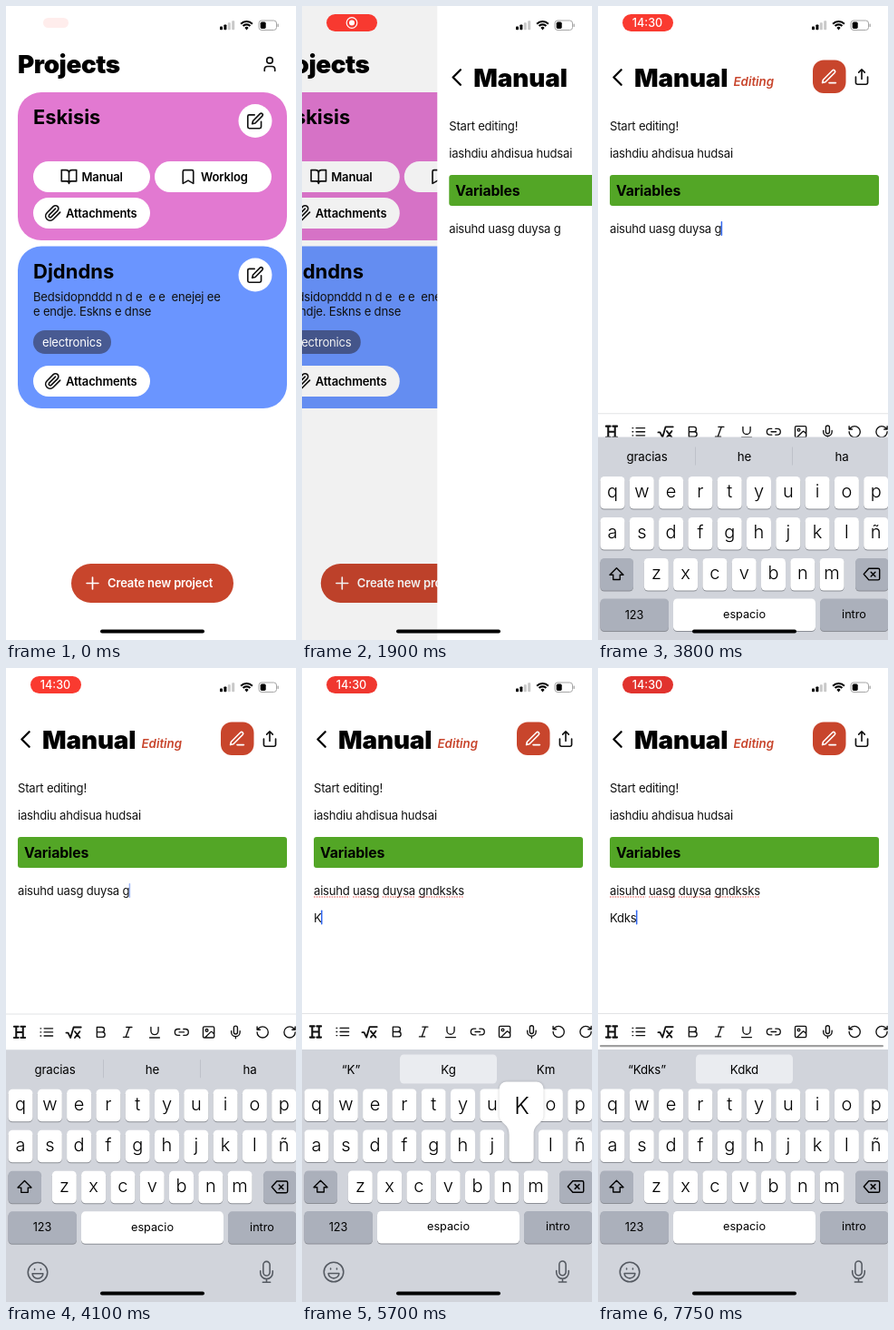
An HTML page with a canvas that plays this animation: 320x698 px, repeating every 8000 ms.

```html
<!DOCTYPE html>
<html lang="en">
<head>
<meta charset="utf-8">
<title>Projects app</title>
<style>
html, body { margin: 0; width: 100%; height: 100%; overflow: hidden; background: #fff; }
canvas { display: block; width: 100vw; height: 100vh; }
</style>
</head>
<body>
<canvas id="stage"></canvas>
<script>
const W = 320, H = 698, LOOP = 8000;
const canvas = document.getElementById('stage');
const ctx = canvas.getContext('2d');
const RED = '#c8452c';

const ICONS = {
  user: 'M19 21v-2a4 4 0 0 0-4-4H9a4 4 0 0 0-4 4v2M16 7a4 4 0 1 1-8 0a4 4 0 1 1 8 0',
  book: 'M2 3h6a4 4 0 0 1 4 4v14a3 3 0 0 0-3-3H2zM22 3h-6a4 4 0 0 0-4 4v14a3 3 0 0 1 3-3h7z',
  bookmark: 'M19 21l-7-4-7 4V5a2 2 0 0 1 2-2h10a2 2 0 0 1 2 2z',
  clip: 'M21.4 11l-9.2 9.2a6 6 0 0 1-8.5-8.5l8.6-8.6A4 4 0 1 1 18 8.8l-8.6 8.6a2 2 0 0 1-2.8-2.8l8.5-8.5',
  edit: 'M11 4H4a2 2 0 0 0-2 2v14a2 2 0 0 0 2 2h14a2 2 0 0 0 2-2v-7M18.5 2.5a2.1 2.1 0 0 1 3 3L12 15l-4 1 1-4z',
  pen: 'M12 20h9M16.5 3.5a2.1 2.1 0 0 1 3 3L7 19l-4 1 1-4z',
  share: 'M4 12v8a2 2 0 0 0 2 2h12a2 2 0 0 0 2-2v-8M16 6l-4-4-4 4M12 2v13',
  back: 'M15 18l-6-6 6-6',
  plus: 'M5 12h14M12 5v14',
  heading: 'M3 3h7M14 3h7M3 21h7M14 21h7M6.5 3v18M17.5 3v18M7 12h10',
  list: 'M8 6h14M8 12h14M8 18h14M2 6h1M2 12h1M2 18h1',
  root: 'M0 13h3l4 8L12 4h12M14 11l8 10M22 11l-8 10',
  bold: 'M14 12a4 4 0 0 0 0-8H6v8M15 20a4 4 0 0 0 0-8H6v8z',
  italic: 'M19 4h-9M14 20H5M15 4L9 20',
  underline: 'M6 4v6a6 6 0 0 0 12 0V4M4 21h16',
  link: 'M9 17H6A5 5 0 0 1 6 7h3M15 7h3a5 5 0 0 1 0 10h-3M8 12h8',
  image: 'M5 3h14a2 2 0 0 1 2 2v14a2 2 0 0 1-2 2H5a2 2 0 0 1-2-2V5a2 2 0 0 1 2-2zM11 9a2 2 0 1 1-4 0a2 2 0 1 1 4 0M21 15l-3.1-3.1a2 2 0 0 0-2.8 0L6 21',
  mic: 'M12 2a3 3 0 0 0-3 3v7a3 3 0 0 0 6 0V5a3 3 0 0 0-3-3zM19 10v2a7 7 0 0 1-14 0v-2M12 19v3',
  dictate: 'M12 1a3.5 3.5 0 0 0-3.5 3.500v8a3.500 3.500 0 0 0 7 0v-8A3.500 3.500 0 0 0 12 1zM18.500 11v2a6.500 6.500 0 0 1-13 0v-2M12 19.500v3.500M8 23h8',
  undo: 'M3 12a9 9 0 1 0 9-9 9.7 9.7 0 0 0-6.7 2.7L3 8M3 3v5h5',
  redo: 'M21 12a9 9 0 1 1-9-9 9.7 9.7 0 0 1 6.7 2.7L21 8M21 3v5h-5',
  shift: 'M12 3L2 13h5v7h10v-7h5z',
  erase: 'M8 4h13a2 2 0 0 1 2 2v12a2 2 0 0 1-2 2H8L1 12zM11 9l6 6M17 9l-6 6',
  smile: 'M23 12a11 11 0 1 1-22 0a11 11 0 1 1 22 0M6 13.5h12a6 5.500 0 0 1-12 0M8.500 8v1M15.500 8v1'
};
for (const name in ICONS) ICONS[name] = new Path2D(ICONS[name]);

const TOOLS = ['heading', 'list', 'root', 'bold', 'italic', 'underline', 'link', 'image', 'mic', 'undo', 'redo'];
const ROWS = [['qwertyuiop', 16], ['asdfghjklñ', 16], ['zxcvbnm', 64.3]];
const PITCH = 32.3;

const T = { push: 1800, edit: 3100, focus: 3700, keyboard: 3650, enter: 5350, drag: 6150 };
const STROKES = [
  ...[...'ndksks'].map((ch, i) => ({ ch, at: 4350 + 130 * i, line: 0 })),
  ...[...'Kdks'].map((ch, i) => ({ ch, at: 5600 + 115 * i, line: 1 }))
];
const HINTS = [
  [0, 'gracias', 'he', 'ha'],
  [4350, '“gn”', 'gen', 'generalist'],
  [4500, '“gnd”', 'gen', 'generalist'],
  [5180, '“gndksks”', '', ''],
  [T.enter, 'Hola', 'No', 'Que'],
  [5620, '“K”', 'Kg', 'Km'],
  [5960, '“Kdks”', 'Kdkd', '']
];
const SCROLL = [[T.drag, 0], [6330, 43.5], [6400, 43.5], [6600, 50], [6750, 43.5], [7250, 0], [7450, -5], [7740, 0]];

const clamp = v => Math.min(1, Math.max(0, v));
const ramp = (t, a, b) => clamp((t - a) / (b - a));
const smooth = v => v * v * (3 - 2 * v);
const mix = (a, b, k) => a + (b - a) * k;
const spring = ms => ms <= 0 ? 1 : (1 + ms / 50) * Math.exp(-ms / 50);

function track(keys, t) {
  if (t <= keys[0][0]) return keys[0][1];
  for (let i = 1; i < keys.length; i++) {
    const [a, u] = keys[i - 1], [b, v] = keys[i];
    if (t < b) return mix(u, v, smooth(ramp(t, a, b)));
  }
  return keys[keys.length - 1][1];
}

function box(x, y, w, h, r, color) {
  ctx.fillStyle = color;
  ctx.beginPath();
  ctx.roundRect(x, y, w, h, r);
  ctx.fill();
}

function disc(x, y, r, color) {
  ctx.fillStyle = color;
  ctx.beginPath();
  ctx.arc(x, y, r, 0, 7);
  ctx.fill();
}

// y is the middle of the capital letters
function text(str, x, y, size, { weight = 400, color = '#000', align = 'left', gap = 0, style = '' } = {}) {
  ctx.font = `${style} ${weight} ${size}px Inter, "Liberation Sans", sans-serif`;
  ctx.letterSpacing = gap + 'px';
  ctx.textAlign = align;
  ctx.fillStyle = color;
  ctx.fillText(str, x, y + size * 0.364);
}

const body = (str, x, y, color = '#111') => text(str, x, y, 13.1, { gap: -0.22, color });
const label = (str, x, y, color = '#000') => text(str, x, y, 13, { weight: 600, gap: -0.15, color });

function width(str) {
  ctx.font = '400 13.1px Inter, "Liberation Sans", sans-serif';
  ctx.letterSpacing = '-0.22px';
  return ctx.measureText(str).width;
}

function icon(name, x, y, size = 19.7, color = '#111', weight = 2, filled = false) {
  ctx.save();
  ctx.translate(x - size / 2, y - size / 2);
  ctx.scale(size / 24, size / 24);
  ctx.strokeStyle = ctx.fillStyle = color;
  ctx.lineWidth = weight;
  ctx.lineCap = ctx.lineJoin = 'round';
  if (filled) ctx.fill(ICONS[name]);
  ctx.stroke(ICONS[name]);
  ctx.restore();
}

function button(x, y, name, str, iconX, textX) {
  box(x, y, 129, 34, 17, '#fff');
  icon(name, iconX, y + 17);
  label(str, textX, y + 17);
}

function projects(t) {
  box(0, 0, W, H, 0, '#fff');
  text('Projects', 13, 64, 27.8, { weight: 900, gap: -0.4 });
  icon('user', 291, 64);

  box(13, 95, 297, 163, 26, '#e279d1');
  text('Eskisis', 30, 122.5, 21.8, { weight: 700 });
  disc(275, 126.5, 18.5, '#fff');
  icon('edit', 275, 126.5);
  ctx.save();
  ctx.globalAlpha *= t < 1500 ? 1 - 0.55 * ramp(t, 1400, 1480) : mix(0.45, 1, ramp(t, 1500, 1700));
  button(30, 171, 'book', 'Manual', 69.5, 83.5);
  ctx.restore();
  button(164, 171, 'bookmark', 'Worklog', 201, 215);
  button(30, 211, 'clip', 'Attachments', 52, 66);

  box(13, 264.5, 297, 178.5, 26, '#6a95ff');
  text('Djdndns', 30, 292, 22, { weight: 700 });
  disc(275, 296, 18.5, '#fff');
  icon('edit', 275, 296);
  body('Bedsidopnddd n d e  e e  enejej ee', 30, 320.5);
  body('e endje. Eskns e dnse', 30, 336.5);
  box(30, 357, 86, 26, 13, '#485a92');
  body('electronics', 40, 370, '#fff');
  button(30, 396, 'clip', 'Attachments', 52, 66);

  box(72, 614, 179, 43, 21.5, RED);
  icon('plus', 95.5, 635.5, 22, '#fff', 1.8);
  label('Create new project', 112, 635.5, '#fff');
}

function caretAlpha(t) {
  if (t < T.focus) return 0;
  let since = T.focus;
  for (const s of STROKES) if (s.at <= t) since = s.at;
  if (t >= T.enter && since < T.enter) since = T.enter;
  const p = (t - since) % 1000;
  return 1 - ramp(p, 350, 450) + ramp(p, 650, 750);
}

function manual(t) {
  box(0, 0, W, H, 0, '#fff');
  icon('back', 21.5, 78.5, 33, '#000', 1.7);
  text('Manual', 40, 78.5, 27.8, { weight: 900, gap: -0.1 });
  const on = ramp(t, T.edit, T.edit + 120);
  if (on) {
    ctx.save();
    ctx.globalAlpha = on;
    box(237, 59.5, 36.5, 36.5, 12, RED);
    text('Editing', 149.5, 83, 13.3, { weight: 600, style: 'italic', color: RED });
    ctx.restore();
  }
  icon('pen', 255, 78, 19.7, on > 0.5 ? '#fff' : '#111');
  icon('share', 291, 78);

  body('Start editing!', 13, 132);
  body('iashdiu ahdisua hudsai', 13, 162);
  box(13, 186, 297, 34, 3, '#53a626');
  text('Variables', 20, 203.5, 15.8, { weight: 700, gap: -0.15 });

  const lines = ['aisuhd uasg duysa g', ''];
  for (const s of STROKES) if (s.at <= t) lines[s.line] += s.ch;
  lines.forEach((line, i) => body(line, 13, 245.5 + 29.5 * i));

  const row = t >= T.enter ? 1 : 0;
  if (row) {
    ctx.strokeStyle = '#e2504c';
    ctx.lineWidth = 1.2;
    ctx.setLineDash([1.6, 1.2]);
    ctx.beginPath();
    let x = 13;
    for (const word of lines[0].split(' ')) {
      ctx.moveTo(x, 252);
      ctx.lineTo(x + width(word), 252);
      x += width(word + ' ');
    }
    ctx.stroke();
    ctx.setLineDash([]);
  }
  ctx.save();
  ctx.globalAlpha = caretAlpha(t);
  box(12.4 + width(lines[row]), 237 + 29.5 * row, 1.5, 16, 0.7, '#3268f0');
  ctx.restore();
}

function toolbar(t) {
  const y = 380 + 318 * spring(t - T.keyboard - 6);
  const scroll = track(SCROLL, t);
  box(0, y, W, H - y, 0, '#fff');
  box(0, y, W, 1, 0, '#e2e3e5');
  TOOLS.forEach((name, i) => {
    const pressed = name === 'mic' && t > 6250 && t < 6450;
    icon(name, 15 + 29.8 * i - scroll, y + 20.5, 16.3, pressed ? '#555' : '#111', name === 'heading' ? 3 : name === 'root' ? 2.7 : 2);
  });
  if (t > T.drag) {
    const k = clamp(scroll / 43.5);
    const left = mix(2, 46, k);
    ctx.save();
    ctx.globalAlpha = ramp(t, T.drag, T.drag + 80);
    box(left, y + 35, mix(315, 319, k) - left, 2.3, 1.1, '#a0a0a0');
    ctx.restore();
  }
}

function key(x, y, w, color = '#fff') {
  box(x, y + 1, w, 35.5, 4.5, '#8b8e95');
  box(x, y, w, 35.5, 4.5, color);
}

function popup(cx, y, ch) {
  const top = y - 53, bottom = y + 35;
  ctx.save();
  ctx.shadowColor = 'rgba(0,0,0,.22)';
  ctx.shadowBlur = 3;
  ctx.fillStyle = '#fff';
  ctx.beginPath();
  ctx.moveTo(cx - 17, top);
  ctx.arcTo(cx + 24.5, top, cx + 24.5, top + 30, 8);
  ctx.lineTo(cx + 24.5, top + 36);
  ctx.bezierCurveTo(cx + 24.5, top + 47, cx + 13.5, top + 45, cx + 13.5, top + 58);
  ctx.arcTo(cx + 13.5, bottom, cx, bottom, 4.5);
  ctx.arcTo(cx - 13.5, bottom, cx - 13.5, top + 58, 4.5);
  ctx.lineTo(cx - 13.5, top + 58);
  ctx.bezierCurveTo(cx - 13.5, top + 45, cx - 24.5, top + 47, cx - 24.5, top + 36);
  ctx.arcTo(cx - 24.5, top, cx, top, 8);
  ctx.fill();
  ctx.restore();
  text(ch, cx + 0.5, top + 26, 25.5, { weight: 300, align: 'center' });
}

function hints(t) {
  const [, ...words] = HINTS.filter(h => h[0] <= t).pop();
  const typing = words[0][0] === '“';
  if (typing && words[1]) box(108, 425.5, 107, 32, 4.5, '#eaecf0');
  if (!typing) for (const x of [107, 214]) box(x, 431, 1, 20, 0, '#bec1c9');
  words.forEach((w, i) => text(w, 54 + 107.5 * i, 442, 13.3, { align: 'center', gap: -0.1 }));
}

function keyboard(t) {
  ctx.save();
  ctx.translate(0, 278 * spring(t - T.keyboard));
  box(0, 420, W, 278, 0, '#d1d4db');
  hints(t);
  const caps = t >= T.enter && t < 5610;
  const active = STROKES.find(s => t >= s.at && t < s.at + 110);
  let pop = null;
  ROWS.forEach(([chars, start], r) => {
    const y = 463.5 + 45 * r;
    [...chars].forEach((ch, i) => {
      const cx = start + PITCH * i;
      key(cx - 13.5, y, 27);
      text(caps ? ch.toUpperCase() : ch, cx, y + (caps ? 17.5 : 15.8), 20, { weight: 300, align: 'center' });
      if (active && active.ch.toLowerCase() === ch) pop = [cx, y];
    });
  });
  const gray = '#abb0bb';
  key(2.5, 553.5, 36.5, caps ? '#fff' : gray);
  icon('shift', 20.5, 571, 18, '#000', 1.8, caps);
  key(284, 553.5, 36.5, gray);
  icon('erase', 302, 571, 19, '#000', 1.8);
  key(2.5, 598, 75.5, gray);
  key(83, 598, 157);
  key(245, 598, 75.5, t >= T.enter && t < T.enter + 110 ? '#fff' : gray);
  const small = { align: 'center' };
  text('123', 40, 615.5, 12.7, small);
  text('espacio', 161.5, 614.7, 12.7, small);
  text('intro', 282.5, 614.7, 12.7, small);
  icon('smile', 35, 665, 23.5, '#555a62', 1.6);
  icon('dictate', 287.5, 664.5, 25, '#555a62', 1.5);
  if (pop) popup(...pop, active.ch.toUpperCase());
  ctx.restore();
}

function statusBar(t) {
  const grow = smooth(ramp(t, 0, 430));
  const pulse = 0.5 + 0.5 * Math.cos((t - 2750) / 2300 * 2 * Math.PI);
  const dim = smooth(pulse) * ramp(t, 430, 700);
  const w = mix(28, 56, grow), h = mix(11, 19, grow);
  const clock = ramp(t, 3100, 3250);
  ctx.save();
  ctx.globalAlpha = mix(0.09, 1, grow);
  box(55 - w / 2, 18.5 - h / 2, w, h, h / 2, `rgb(${mix(250, 220, dim)},${mix(58, 50, dim)},${mix(48, 45, dim)})`);
  ctx.globalAlpha = ramp(t, 200, 430) * (1 - clock);
  ctx.strokeStyle = '#fff';
  ctx.lineWidth = 1.2;
  ctx.beginPath();
  ctx.arc(55, 18.5, 5.8, 0, 7);
  ctx.stroke();
  disc(55, 18.5, 3, '#fff');
  ctx.globalAlpha = clock;
  text('14:30', 54.5, 18.5, 12.6, { weight: 500, color: '#fff', align: 'center' });
  ctx.restore();

  for (let i = 0; i < 4; i++) {
    const bar = 3.8 + 2.1 * i;
    box(236 + 4.4 * i, 26.3 - bar, 3, bar, 0.8, i < 2 ? '#000' : '#c9c9c9');
  }
  ctx.strokeStyle = '#000';
  ctx.lineWidth = 2.1;
  for (const r of [5.6, 9]) {
    ctx.beginPath();
    ctx.arc(265.5, 26, r, -Math.PI * 0.75, -Math.PI * 0.25);
    ctx.stroke();
  }
  ctx.fillStyle = '#000';
  ctx.beginPath();
  ctx.moveTo(265.5, 26.5);
  ctx.arc(265.5, 26, 3, -Math.PI * 0.75, -Math.PI * 0.25);
  ctx.fill();
  ctx.strokeStyle = '#a5a5a5';
  ctx.lineWidth = 1;
  ctx.beginPath();
  ctx.roundRect(279, 16, 19.5, 10.5, 3);
  ctx.stroke();
  box(299.5, 19.5, 1.3, 3.5, 0.6, '#a5a5a5');
  box(280.7, 17.6, 6, 7.3, 1.6, '#000');
}

function draw(t) {
  const push = 1 - Math.pow(1 - ramp(t, T.push, T.push + 450), 3);
  if (push < 1) {
    ctx.save();
    ctx.translate(-96 * push, 0);
    projects(t);
    ctx.restore();
    if (push) box(0, 0, W, H, 0, `rgba(0,0,0,${0.1 * push})`);
  }
  if (push > 0) {
    ctx.save();
    ctx.translate(W * (1 - push), 0);
    manual(t);
    ctx.restore();
  }
  if (t >= T.keyboard) {
    toolbar(t);
    keyboard(t);
  }
  statusBar(t);
  box(104, 686.6, 115, 4, 2, '#000');
}

function resize() {
  const dpr = window.devicePixelRatio || 1;
  canvas.width = Math.round(innerWidth * dpr);
  canvas.height = Math.round(innerHeight * dpr);
}
addEventListener('resize', resize);
resize();

const begin = performance.now();
function frame() {
  ctx.setTransform(canvas.width / W, 0, 0, canvas.height / H, 0, 0);
  draw((performance.now() - begin) % LOOP);
  requestAnimationFrame(frame);
}
frame();
</script>
</body>
</html>
```
